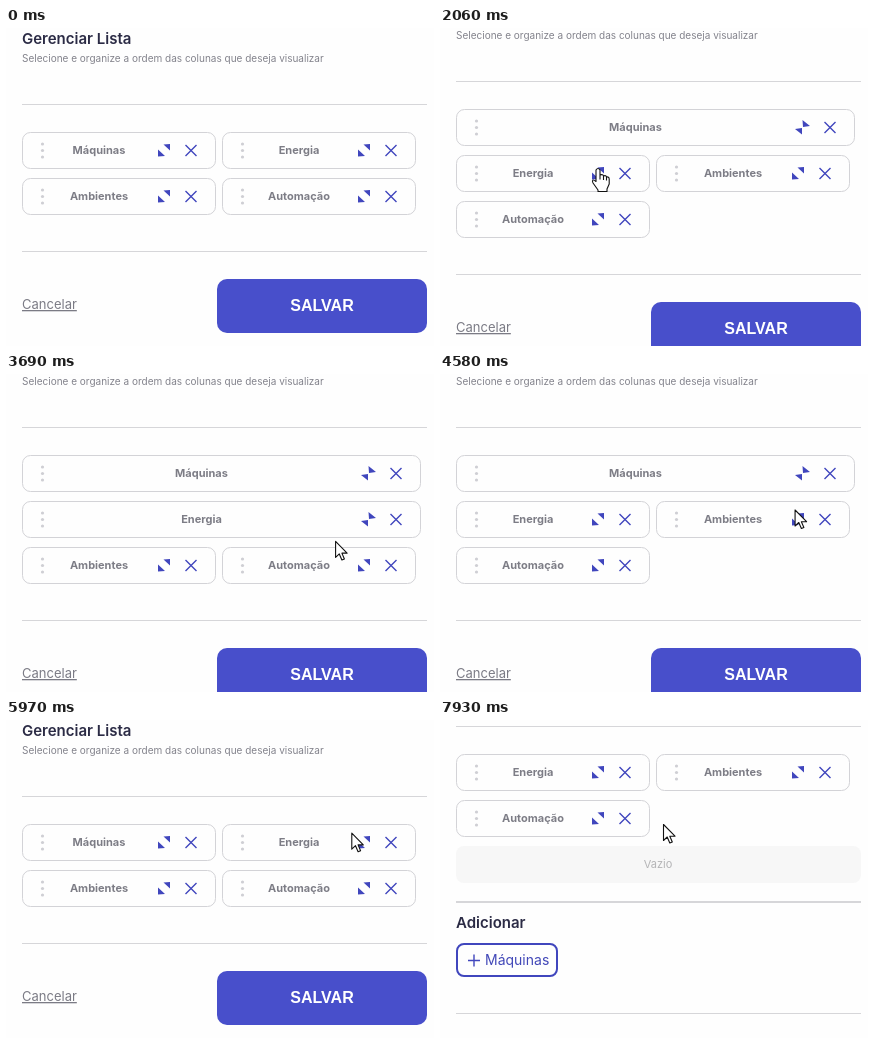
Recreate the animation shown at these times as an HTML page. Size 428 by 318 pixels, loop 8000 ms.

```html
<!DOCTYPE html>
<html lang="pt">
<meta charset="utf-8">
<title>Gerenciar Lista</title>
<style>
html, body { margin: 0; width: 100%; height: 100%; overflow: hidden; background: #fefefe }
svg { display: block; font-family: Inter, sans-serif }
.title { font-size: 15px; font-weight: 600; fill: #2b2b45 }
.sub { font-size: 10px; fill: #83838c }
.label { font-size: 11px; font-weight: 700; fill: #7d7d86; text-anchor: middle }
.empty { font-size: 11px; fill: #b4b4b6; text-anchor: middle }
.cancel { font-size: 13px; fill: #7b7b85; text-decoration: underline }
.save { font: 700 16px "Liberation Sans", Arial, sans-serif; fill: #fff; text-anchor: middle }
.add { font-size: 14px; fill: #4248b8 }
.card { fill: #fefefe; stroke: #d3d3d7 }
.rule { fill: #d6d6d9 }
.dot { fill: #cfcfd4 }
.solid { fill: #4046bd }
.line { fill: none; stroke: #4046bd; stroke-width: 1.4 }
</style>
<svg width="428" height="318">
  <g id="scenes"></g>
  <g id="cursor" fill="#fff" stroke="#111" stroke-width="1.1" stroke-linejoin="round">
    <path id="arrow" d="M.5 .5V16.5L4.2 13L6.8 19L9.3 18L6.8 12.2H12Z"/>
    <path id="hand" d="M-2 2Q0-1 2 2V7Q5 6 5.5 8Q8 7 8.5 9Q11 8.5 11.2 11V16L9 21V23.5H0V22L-5 15Q-7 10-2 13.5ZM2 7V11.5M5.5 8V12M8.5 9V12.5"/>
  </g>
</svg>
<script>
const $ = id => document.getElementById(id);
const text = (cls, x, y, s) => `<text class="${cls}" x="${x}" y="${y}">${s}</text>`;
const rule = (y, h = 1) => `<rect class="rule" x="16" y="${y}" width="405" height="${h}"/>`;

function card(name, x, y, wide) {
  const icon = wide ? 'M346.5 11L347 18L354 17ZM339 20L346 19V25.5Z'
                    : 'M141.5 12.5L148 12V18.5ZM136 17.5V24.5L143 24Z';
  const close = wide ? 368.5 : 163.5;
  return `<g transform="translate(${x} ${y})">
    <rect class="card" x=".5" y=".5" width="${wide ? 398 : 193}" height="36" rx="8"/>
    ${[12, 18.5, 25].map(cy => `<circle class="dot" cx="20.5" cy="${cy}" r="1.6"/>`).join('')}
    ${text('label', wide ? 179.5 : 77, 22, name)}
    <path class="solid" d="${icon}"/>
    <path class="line" d="M${close} 13l11 11m0-11l-11 11"/></g>`;
}

// Cards flow left to right; the first `wide` ones take a full row.
function cards(names, wide, top) {
  return names.map((name, i) => {
    const k = i - wide;
    return k < 0 ? card(name, 16, top + 46 * i, true)
                 : card(name, 16 + 200 * (k % 2), top + 46 * (wide + (k >> 1)));
  }).join('');
}

function form(names, wide, dy, bottom) {
  return text('title', 16, 16 + dy, 'Gerenciar Lista') +
    text('sub', 16, 34 + dy, 'Selecione e organize a ordem das colunas que deseja visualizar') +
    rule(76 + dy) + cards(names, wide, 104 + dy) + rule(bottom) +
    text('cancel', 16, bottom + 58, 'Cancelar') +
    `<rect x="211" y="${bottom + 28}" width="210" height="54" rx="10" fill="#484fcb"/>` +
    text('save', 316, bottom + 60, 'SALVAR');
}

const names = ['Máquinas', 'Energia', 'Ambientes', 'Automação'];
const removed = rule(6) + cards(names.slice(1), 0, 34) +
  '<rect x="16" y="126" width="405" height="37" rx="8" fill="#f7f7f7"/>' +
  text('empty', 218, 148, 'Vazio') + rule(181, 2) + text('title', 16, 208, 'Adicionar') +
  '<rect class="line" x="17" y="224" width="100" height="32" rx="7" style="stroke-width:2"/>' +
  '<path class="line" d="M28 240.5h12m-6-6v12"/>' + text('add', 45, 245, 'Máquinas') + rule(293);
const scenes = [form(names, 0, 0, 223), form(names, 1, -23, 246), form(names, 2, -23, 246), removed];
$('scenes').innerHTML = scenes.map(s => `<g>${s}</g>`).join('');

const cuts = [[0, 0], [1340, 1], [2800, 2], [4440, 1], [5580, 0], [7210, 3]];
// Each glide: start time, end time, end point. The cursor rests in between.
const glides = [
  [190, 480, 245, 198], [480, 940, 158, 126], [1400, 1530, 146, 115], [2000, 2060, 158, 140],
  [2130, 2200, 157, 147], [2400, 2470, 155, 145], [3200, 3430, 230, 176], [3430, 3690, 329, 167],
  [3690, 3970, 354, 153], [3970, 4030, 358, 151], [4230, 4290, 360, 142], [4440, 4700, 350, 130],
  [4700, 5190, 360, 103], [5250, 5450, 360, 100], [5900, 6040, 331, 125], [6140, 6450, 255, 156],
  [6450, 6740, 191, 140], [6740, 6950, 186, 122], [7740, 7930, 223, 104]
];
const pointing = [[870, 1400], [2060, 2930], [4030, 4500], [5100, 5770], [6880, 7340]];

function place(t) {
  let x = 402, y = 306;
  for (const [start, end, toX, toY] of glides) {
    const k = Math.min(1, Math.max(0, (t - start) / (end - start)));
    x += (toX - x) * k;
    y += (toY - y) * k;
  }
  return `translate(${x} ${y})`;
}

const show = (el, on) => el.style.display = on ? '' : 'none';

function draw() {
  const t = performance.now() % 8000;
  const scene = cuts.filter(c => c[0] <= t).pop()[1];
  [...$('scenes').children].forEach((g, i) => show(g, i === scene));
  const hand = pointing.some(([from, to]) => t >= from && t < to);
  show($('cursor'), t >= 190);
  show($('arrow'), !hand);
  show($('hand'), hand);
  $('cursor').setAttribute('transform', place(t));
  requestAnimationFrame(draw);
}
draw();
</script>
</html>
```
